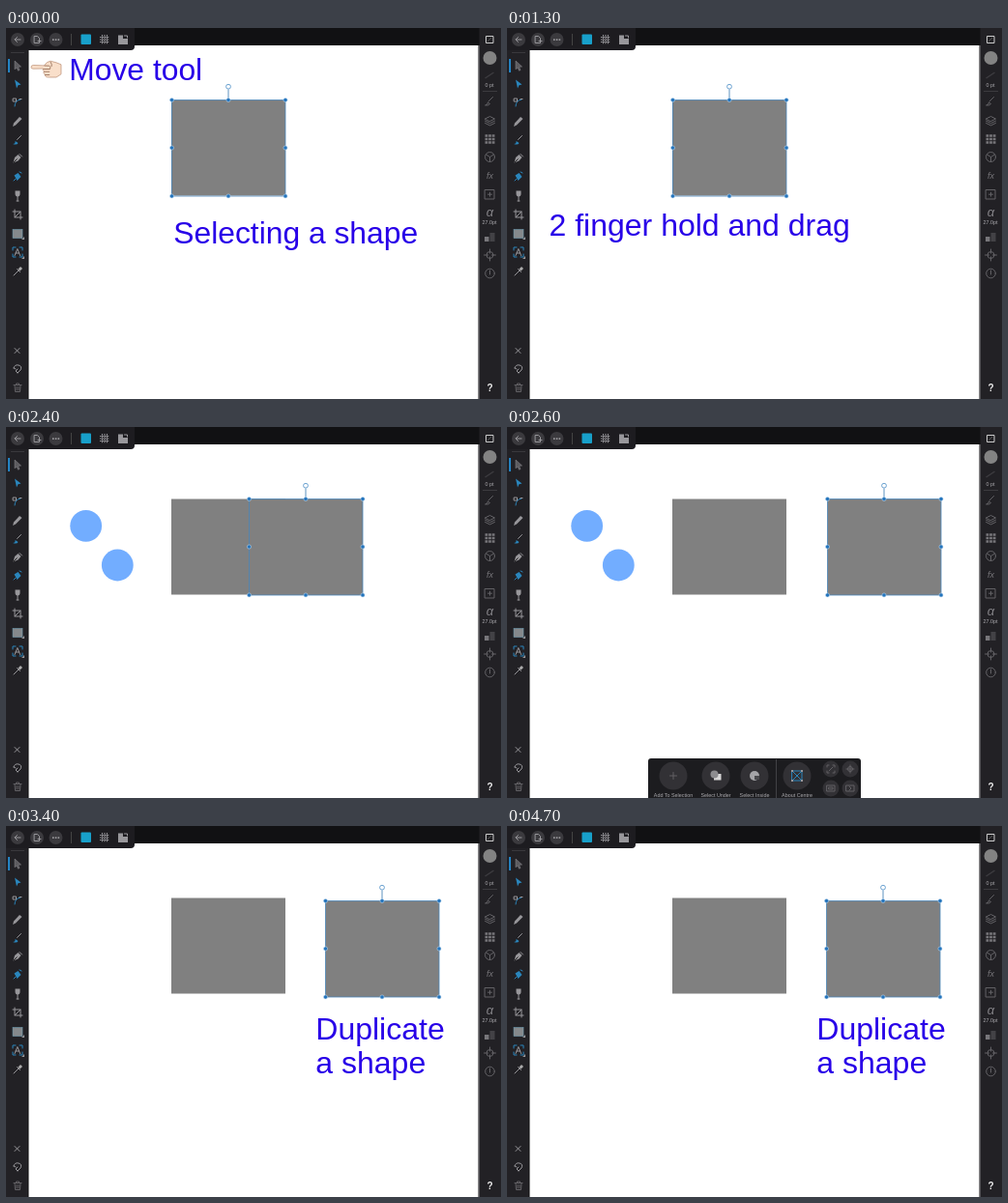
An HTML page that plays this animation: 512 px wide and 384 px high, repeating every 4800 ms.

```html
<!DOCTYPE html>
<html lang="en">
<head>
<meta charset="utf-8">
<title>Duplicating a shape</title>
<style>
  html, body { margin: 0; width: 100%; height: 100%; overflow: hidden; background: #fff; }
  svg { display: block; width: 512px; height: 384px; }
  text { font-family: "Liberation Sans", Arial, sans-serif; }
  .caption { font-size: 32px; fill: #2800e8; }
  .bar { fill: #222125; }
  .line { fill: none; stroke: #98979b; stroke-width: 1; stroke-linecap: round; stroke-linejoin: round; }
  .dim { stroke: #626165; }
  .blue { stroke: #2a86bd; }
  .grey { fill: #98979b; }
  .tiny { font-size: 5.4px; fill: #aaa9ad; text-anchor: middle; }
</style>
</head>
<body>
<svg viewBox="0 0 512 384">
  <defs>
    <g id="selection">
      <rect x=".5" y=".5" width="117.500" height="99.500" fill="none" stroke="#4a86b8" stroke-width=".8"/>
      <path d="M59 0V-10.500" stroke="#4a86b8" stroke-width=".9"/>
      <circle cx="59" cy="-13.300" r="2.400" fill="#fff" stroke="#5c98cb" stroke-width=".9"/>
      <g id="handles" fill="#2374bd" stroke="#c9dff1" stroke-width=".5"></g>
    </g>
  </defs>
  <rect width="512" height="384" fill="#fff"/>

  <rect id="base" x="171" y="74.500" width="118" height="99" fill="#808080"/>
  <use id="baseSelection" href="#selection" x="171" y="74"/>
  <g id="copy">
    <rect x=".5" y=".5" width="117.500" height="99.500" fill="#808080"/>
    <use href="#selection"/>
  </g>
  <g id="fingers" fill="#72adff">
    <circle cx="82.700" cy="102.300" r="16.400"/>
    <circle cx="115.300" cy="143" r="16.400"/>
  </g>

  <g id="intro">
    <path d="M26 40.500q0-2 2.200-2l11.300.4q2.500-4.200 6.500-4.700l6 1.600 5 2v10l-5 3.200h-7.500q-4.500 0-4.300-3-2-1.300-1-3.300-1.600-1-.7-2.700l-10.300.2q-2.200 0-2.200-1.700z" fill="#f9dfca" stroke="#b98c70" stroke-width=".7"/>
    <path d="M39.500 39l5 .2q2.500 1 1 3.300h-7M39.200 45.200h6M40.200 48.500h5M46 35q2 3 1 5" fill="none" stroke="#8d6650" stroke-width=".8"/>
    <g class="caption" style="font-size:31.800px">
      <text x="65.300" y="54">Move tool</text>
      <text x="173.300" y="222.800">Selecting a shape</text>
    </g>
  </g>
  <text id="hold" class="caption" x="43.500" y="214.800">2 finger hold and drag</text>
  <g id="result" class="caption">
    <text x="320.300" y="221.200">Duplicate</text>
    <text x="320.300" y="256.200">a shape</text>
  </g>

  <!-- Context toolbar -->
  <g id="toolbar" transform="translate(0 1)">
    <rect x="146" y="342" width="220" height="50" rx="3" fill="#1c1c1f"/>
    <g fill="#323135">
      <circle cx="172" cy="360" r="14.500"/><circle cx="216" cy="360" r="14.500"/>
      <circle cx="256" cy="360" r="14.500"/><circle cx="300" cy="360" r="14.500"/>
      <circle cx="335" cy="353" r="8.500"/><circle cx="355" cy="353" r="8.500"/>
      <circle cx="335" cy="373" r="8.500"/><circle cx="355" cy="373" r="8.500"/>
    </g>
    <path d="M278.500 343V384" stroke="#414145"/>
    <path class="line dim" d="M168.500 360h7M172 356.500v7"/>
    <path d="M216 358h5.500v6.500H214v-3" fill="#d8d8d8"/><circle cx="214.500" cy="358.500" r="4" fill="#8d8d90"/>
    <circle cx="256" cy="360" r="5" fill="#a5a5a8"/><path d="M256 360h5v4h-5z" fill="#4a4a4d"/>
    <path class="line blue" d="M295 355h10v10h-10zl10 10m0-10l-10 10"/>
    <path class="grey" d="M294 354h2v2h-2zM304 354h2v2h-2zM294 364h2v2h-2zM304 364h2v2h-2z"/>
    <path class="line dim" d="M331 351v-2h2m4 0h2v2m0 4v2h-2m-4 0h-2v-2m2 0l4-4M351 353h8m-4-4v8M331 370h8v6h-8zm2 2h4v2h-4zM351 370h8v6h-8zm3 1l2 2-2 2"/>
    <circle class="line dim" cx="355" cy="353" r="2.500"/>
    <g class="tiny">
      <text x="172" y="381.500">Add To Selection</text><text x="216" y="381.500">Select Under</text>
      <text x="256" y="381.500">Select Inside</text><text x="300" y="381.500">About Centre</text>
    </g>
  </g>

  <!-- Application frame -->
  <rect width="512" height="18" fill="#111113"/>
  <rect class="bar" y="17" width="23" height="367"/>
  <path d="M23 23V384M489 17V384" stroke="#101012"/>
  <rect class="bar" x="489.500" width="23" height="384"/>
  <path d="M0 0H133V19q0 4-4 4H0z" fill="#1d1c20"/>
  <g fill="#3b3a3e"><circle cx="12" cy="12" r="7"/><circle cx="32" cy="12" r="7"/><circle cx="51.500" cy="12" r="7"/></g>
  <path class="line" d="M15 12H9l2.500-2.500M9 12l2.500 2.500M29.500 8.500h3l2 2v5h-5zM33 13.500h3"/>
  <path class="grey" d="M48 11.300h1.600v1.600H48zM50.800 11.300h1.600v1.600h-1.600zM53.600 11.300h1.600v1.600h-1.600z"/>
  <path d="M67.500 6V18" stroke="#444"/>
  <rect x="77.500" y="6.500" width="10.500" height="10.500" rx="1" fill="#18a0ca"/>
  <path d="M97 9.500h10M97 12h10M97 14.500h10M99.500 7v10M102 7v10M104.500 7v10" stroke="#98979b" stroke-width="1.100" stroke-dasharray="1.700 .8"/>
  <path class="grey" d="M116 7.500h5v3.500h5v6h-10z"/><path class="line" d="M122.500 8h3v2"/>

  <!-- Tools -->
  <path d="M5 25.500H19" stroke="#3a393d"/>
  <rect x="2" y="32" width="2" height="14" fill="#2383c4"/>
  <path d="M9 34l6.500 6-3 .3 1.500 3.200-1.500.7-1.500-3.200-2 1.800z" fill="#5c5b5f" stroke="#858488" stroke-width=".6"/>
  <path d="M9 53.500l6.500 5-3 .7-1.500 3.300z" fill="#2a86bd"/>
  <path class="line blue" d="M9 81q0-6 6-7"/><path class="line" d="M7.500 73h3v3h-3zM14 73.500h2"/>
  <path d="M7 102l1-3.500 6-6.500 2.500 2-6.500 6.500z" fill="#98979b"/>
  <path class="line" stroke-width="1.600" d="M11.500 115.500l4-4"/><path d="M7 120q3 0 2.500-3l3 2q-1 2.500-5.500 1z" fill="#2a86bd"/>
  <path d="M7.500 139.500l1.500-5.500 3.500-3 3 3-3 3.500z" class="grey"/><path d="M8 139l3.500-3.500" stroke="#222"/><path class="line" d="M14 130.500l2.500 2.500"/>
  <path d="M8.500 152.500l4-2.500 3 4-4 4z" fill="#2a86bd"/><path class="line blue" d="M8 158l2-2m4-7l2 1"/>
  <path d="M9.500 168.500h5v3q0 3-2.500 3t-2.500-3z" class="grey"/><path class="line" d="M12 174v5m-1 0h2"/>
  <path class="line" d="M9 188v8h8M7 190h8v8M9 196l6-6"/>
  <rect x="7" y="208.500" width="10" height="9" fill="#85898c" stroke="#6f9ab0" stroke-width=".6"/>
  <path class="grey" d="M19 216v3h-3zM19 236v3h-3z"/>
  <path class="line blue" d="M7 230v-3h3m4 0h3v3m0 4v3h-3m-4 0H7v-3"/>
  <path class="line" d="M9 235.500l2.800-7 2.800 7M10 233h3.500"/>
  <path class="line" d="M8 256l5-5m-1.500-1.500l3 3"/><path d="M12.500 249.500l2.500-2.500 2 2-2.500 2.500z" fill="#aaa"/>
  <path class="line" d="M9 331.500l5 5m0-5l-5 5"/>
  <path class="line" d="M8 352q1-4 5-3t2 5l-3 3M8 352l2 1m2 4l-2-2 2-2"/>
  <path class="line dim" d="M8 369.500h8m-5.500 0v-1.500h3v1.500M9 370l.5 6.500h5l.5-6.500M11 371.500v3.500m2-3.500v3.500"/>

  <!-- Studio panels -->
  <path d="M496.500 8.500h7.500v7h-7.500z" fill="none" stroke="#ccc"/><path d="M498 14l4-4" stroke="#555"/>
  <circle cx="500.500" cy="31" r="7" fill="#838383"/>
  <path d="M495.500 52l9-6" stroke="#3c3b3f" stroke-width="1.500"/>
  <text class="tiny" x="500" y="61">0 pt</text>
  <path d="M493 65.500H508" stroke="#3c3b3f"/>
  <path class="line dim" d="M499 76l4.500-4.500M496 80q2 0 2.500-3l2 1.500q-1 2-4.500 1.500z"/>
  <path class="line dim" d="M495.500 94l5-2.500 5 2.500-5 2.500zm0 2.200l5 2.500 5-2.500m-10 2.200l5 2.500 5-2.500"/>
  <path d="M495.500 111.500h10m-10 3.500h10m-10 3.500h10" stroke="#77767a" stroke-width="2.300" stroke-dasharray="2.800 .8"/>
  <g class="line dim">
    <circle cx="500.500" cy="133.500" r="5"/>
    <path d="M496.500 131l4 2.500 4-2.500m-4 2.500v5"/>
    <path d="M495.500 167.500h9.500v9.500h-9.500zm3 4.700h4m-2-2v4"/>
    <circle cx="500.500" cy="235" r="3.500"/><path d="M500.500 229v4m0 4v4M494.500 235h4m4 0h4"/>
    <circle cx="500.500" cy="254" r="4.800"/><path d="M500.500 251v4"/>
  </g>
  <path d="M495 216h4.500v5H495z" fill="#77767a"/><path d="M500.500 212h5v9h-5z" fill="#434246"/>
  <text x="500.500" y="156" font-size="9" font-style="italic" fill="#77767a" text-anchor="middle">fx</text>
  <text x="500.500" y="195" font-size="13" font-style="italic" fill="#858488" text-anchor="middle">α</text>
  <text class="tiny" x="500" y="203">27.0pt</text>
  <text x="500.500" y="376" font-size="10" font-weight="bold" fill="#eee" text-anchor="middle">?</text>
</svg>
<script>
  const LOOP = 4800, STEP = 100;
  const byId = id => document.getElementById(id);

  byId('handles').innerHTML = [0.5, 59, 118].flatMap(x => [0.5, 50, 100].map(y =>
    x === 59 && y === 50 ? '' : `<circle cx="${x}" cy="${y}" r="2.100"/>`)).join('');

  // Visible interval of each part, in ms
  const spans = {
    intro: [0, 1100],
    hold: [1100, 2400],
    baseSelection: [0, 2300],
    fingers: [2000, 3100],
    copy: [2300, LOOP],
    toolbar: [2500, 3100],
    result: [2800, LOOP]
  };

  const progress = (t, from, to) => {
    const p = Math.min(1, Math.max(0, (t - from) / (to - from)));
    return p * p * (3 - 2 * p);
  };

  function draw(now) {
    const t = Math.floor(now % LOOP / STEP) * STEP;
    for (const [id, [from, to]] of Object.entries(spans))
      byId(id).style.display = t >= from && t < to ? '' : 'none';
    const drag = progress(t, 2200, 2600), settle = progress(t, 2600, 2800);
    byId('copy').setAttribute('transform',
      `translate(${171 + 160 * drag - settle} ${74 + 3 * settle})`);
    requestAnimationFrame(() => draw(performance.now()));
  }
  draw(performance.now());
</script>
</body>
</html>
```
